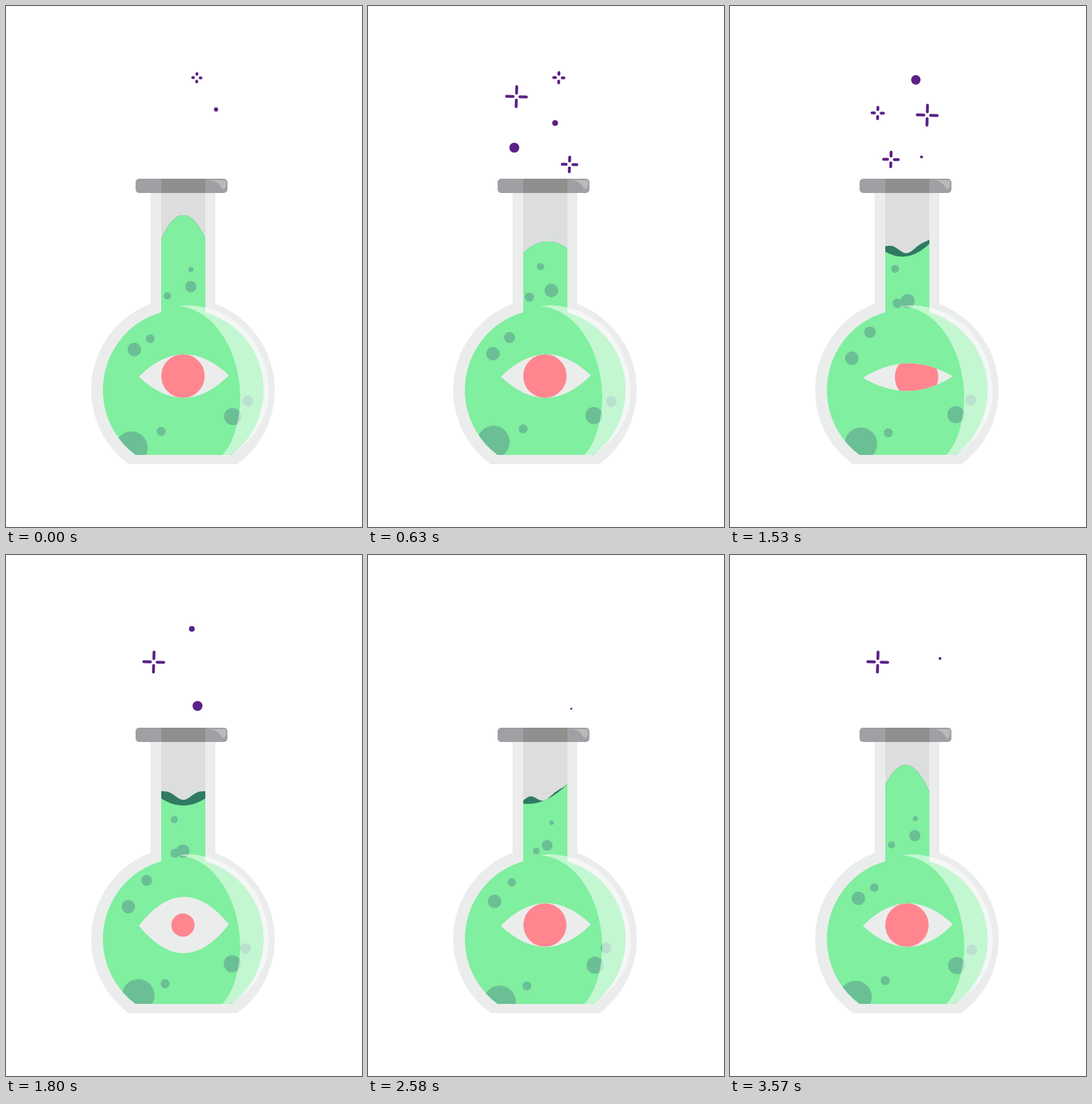
These frames come from a looping animation (500x730 px, 3.6 s). An HTML page with a canvas:

```html
<!DOCTYPE html>
<html lang="en">
<head>
<meta charset="utf-8">
<title>Potion flask</title>
<style>
html, body { margin: 0; width: 100%; height: 100%; overflow: hidden; background: #fff; }
canvas { display: block; }
</style>
</head>
<body>
<canvas id="stage" width="500" height="730"></canvas>
<script>
const ctx = document.getElementById('stage').getContext('2d');
const LOOP = 3600, TAU = Math.PI * 2, STAR_LIFE = 500, DOT_LIFE = 660;
const GLASS = '#ebedec', LIQUID = '#80ef9f', BUBBLE = '#6bbf95',
      DEEP = '#307a62', IRIS = '#ff868e', SPARK = '#5b2088';
const clamp = v => Math.min(1, Math.max(0, v));

// Eased steps between [time, value] pairs, held outside them.
function ease(keys, t) {
  let [lastTime, value] = keys[0];
  for (const [time, next] of keys.slice(1)) {
    const u = clamp((t - lastTime) / (time - lastTime));
    value += (next - value) * u * u * (3 - 2 * u);
    lastTime = time;
  }
  return value;
}

function fill(color, path) {
  ctx.fillStyle = color;
  ctx.fill(path);
}

function rect(color, x, y, w, h) {
  ctx.fillStyle = color;
  ctx.fillRect(x, y, w, h);
}

function disc(x, y, r, color) {
  ctx.fillStyle = color;
  ctx.beginPath();
  ctx.arc(x, y, Math.max(0, r), 0, TAU);
  ctx.fill();
}

// Neck joined to a round bulb with a flat foot.
function flaskPath(left, right, top, cx, cy, r, foot) {
  const neckAngle = x => -Math.acos((x - cx) / r);
  const footAngle = Math.asin((foot - cy) / r);
  const p = new Path2D();
  p.moveTo(left, top);
  p.lineTo(right, top);
  p.arc(cx, cy, r, neckAngle(right), footAngle);
  p.arc(cx, cy, r, Math.PI - footAngle, neckAngle(left));
  p.closePath();
  return p;
}

const outer = flaskPath(203, 294, 255, 248.5, 538, 129, 642);
const inner = flaskPath(218, 280, 262, 249, 538, 113, 629);
const shine = new Path2D(`M242 421 C250 419 262 419 272 421 C330 430 369 482 369 541
  C369 580 345 612 314 629 L304 629 C320 612 329 580 329 547 C328.5 482 291 423 242 421Z`);
const rimShine = new Path2D('M287 244 H306 Q309 244 309 248 Q309 256 305 256.5 Q303 256 301 252 Q297 246 287 244Z');
const rim = new Path2D();
rim.roundRect(182, 242, 129, 20, 5);

// Slosh as a parabola: time, level, tilt, bend. The loop's second half mirrors the first.
const firstHalf = [
  [0, 293, 0, 33],
  [30, 294.5, -5, 32.5],
  [630, 330, -3, 13],
  [960, 342.5, 15, -7.5],
  [1470, 345, -11.5, -8.5],
  [1530, 350.5, -5.5, -12],
  [1800, 351, 0, -10]
];
const slosh = firstHalf.concat(firstHalf.slice(1, -1).reverse()
  .map(([t, level, tilt, bend]) => [LOOP - t, level, -tilt, bend]));

// Smooth periodic curve through one column of the slosh keys.
function sloshAt(column, t) {
  const n = slosh.length;
  const time = i => slosh[(i + n) % n][0] + Math.floor(i / n) * LOOP;
  const value = i => slosh[(i + n) % n][column];
  const slope = i => (value(i + 1) - value(i - 1)) / (time(i + 1) - time(i - 1));
  let i = n - 1;
  while (time(i) > t) i--;
  const d = time(i + 1) - time(i), u = (t - time(i)) / d, v = 1 - u;
  return v * v * (1 + 2 * u) * value(i) + u * u * (3 - 2 * u) * value(i + 1)
    + u * v * d * (v * slope(i) - u * slope(i + 1));
}

function surface(height, bottom) {
  const p = new Path2D();
  for (let u = -1; u <= 1.001; u += 0.05) p.lineTo(249 + 31 * u, height(u));
  p.lineTo(280, bottom);
  p.lineTo(218, bottom);
  p.closePath();
  return p;
}

function drawLiquid(t) {
  const [level, tilt, bend] = [1, 2, 3].map(column => sloshAt(column, t));
  const front = u => level + tilt * u + bend * u * u;
  // The far edge shows as two humps, the taller one on the low side.
  const gap = 8 * clamp(1 - Math.abs(tilt) / 12);
  const hump = u => (6.5 + 0.45 * tilt * u) * Math.sin(0.8 * Math.PI * u) ** 2;
  const back = u => front(u) - clamp(-bend / 7) * (gap + hump(u));
  fill(DEEP, surface(back, 360));
  fill(LIQUID, surface(front, 440));
  rect(LIQUID, 130, 424, 240, 210);
}

// Each bubble drifts on an ellipse: centre, radius, swell, then cosine and sine reach.
const bubbles = [
  [254, 404, 8.7, 1.5, [5.6, -10.8], [1.2, -0.6]],
  [248, 370, 4.3, 1.5, [11.7, -0.7], [-12.5, -5]],
  [232, 412, 5.7, 1.3, [-5.2, -5.8], [-3.4, -1.7]],
  [176, 487, 9.5, 0, [4.2, -5.8], [-2.7, 3.1]],
  [200, 461, 6.9, 1.5, [2.5, 5.1], [-2.6, 1.4]],
  [181, 618, 22.8, 0, [-4.8, 0.9], [-2.9, -8.5]],
  [220.7, 598.3, 6.3, 0, [-2.8, -2.3], [-1.9, -5.2]],
  [318, 574, 12, 0, [0.3, 1.2], [-1, -1]],
  [338, 552.4, 7.5, 0, [1.6, 1], [3.4, 1.6]]
];

function drawBubbles(t) {
  const angle = TAU * t / LOOP, c = Math.cos(angle), s = Math.sin(angle);
  for (const [x, y, r, swell, a, b] of bubbles) {
    disc(x + a[0] * c + b[0] * s, y + a[1] * c + b[1] * s, r + swell * Math.sin(angle - 0.5), BUBBLE);
  }
}

function drawEye(t) {
  const open = ease([[720, 30.5], [900, 15], [1470, 15], [1700, 39.5], [2350, 39.5], [2600, 30.5]], t);
  const look = ease([[720, 0], [900, -22.5], [1120, -22.5], [1300, 22.5], [1440, 22.5], [1650, 0]], t);
  const size = ease([[1530, 30.5], [1750, 16.3], [2350, 16.3], [2600, 30.5]], t);
  const cy = 518.5 + Math.max(0, 30.5 - open) * 0.13;
  const lids = new Path2D();
  lids.moveTo(186.5, cy + 1);
  lids.quadraticCurveTo(249, cy - 2 * open, 313, cy - 1);
  lids.quadraticCurveTo(251, cy + 2 * open, 186.5, cy + 1);
  fill(GLASS, lids);
  ctx.save();
  ctx.clip(lids);
  disc(248.5 + look, cy, size, IRIS);
  ctx.restore();
}

// Spots where sparks appear, each with its start times.
const bigStars = [
  [268, 100.5, [-20, 580, 1880]], [208.5, 127, [380]], [206.5, 170.5, [785, 2700]],
  [213, 90.5, [1020, 2930]], [277, 153, [1280]], [207.5, 150, [1463, 3300]]
];
const smallStars = [
  [283, 222, [400]], [226, 215, [1300]], [249, 172, [1950]], [250.5, 220, [2750]]
];
const dots = [
  [295, 145, [-90, 3510]], [205.5, 198.5, [280]], [262.8, 164, [502]], [211, 121, [845]],
  [261, 103.5, [1270]], [269, 211.5, [1468]], [285.5, 215.5, [1963]],
  [287, 155, [2719]], [244, 123, [2860]]
];

function star(x, y, p, reach) {
  const tip = 4.8 + (reach - 6.8) * clamp(p / 0.4);
  const root = 4.7 + (tip - 4.7) * clamp((p - 0.7) / 0.3);
  ctx.save();
  ctx.translate(x, y);
  ctx.rotate(0.03);
  ctx.beginPath();
  for (let i = 0; i < 4; i++) {
    ctx.moveTo(root, 0);
    ctx.lineTo(tip + 0.01, 0);
    ctx.rotate(Math.PI / 2);
  }
  ctx.stroke();
  ctx.restore();
}

function eachSpark(spots, life, t, paint) {
  for (const [x, y, starts] of spots) {
    for (const start of starts) {
      const p = (t - start) / life;
      if (p > 0 && p < 1) paint(x, y, p);
    }
  }
}

function drawSparks(t) {
  ctx.strokeStyle = SPARK;
  ctx.lineWidth = 4;
  ctx.lineCap = 'round';
  eachSpark(bigStars, STAR_LIFE, t, (x, y, p) => star(x, y, p, 16));
  eachSpark(smallStars, STAR_LIFE, t, (x, y, p) => star(x, y, p, 12.3));
  eachSpark(dots, DOT_LIFE, t, (x, y, p) => disc(x, y, 7 * Math.sin(Math.PI * p), SPARK));
}

function draw(t) {
  rect('#fff', 0, 0, 500, 730);
  fill(GLASS, outer);
  rect('#dcdedd', 218, 262, 62, 168);

  ctx.save();
  ctx.clip(inner);
  drawLiquid(t);
  drawBubbles(t);
  ctx.restore();

  fill('rgba(255,255,255,0.53)', shine);
  drawEye(t);
  fill('#a09fa3', rim);
  rect('#8f908e', 218, 242, 62, 20);
  fill('#bababa', rimShine);
  drawSparks(t);
}

const begin = performance.now();
function tick() {
  draw((performance.now() - begin) % LOOP);
  requestAnimationFrame(tick);
}
tick();
</script>
</body>
</html>
```
